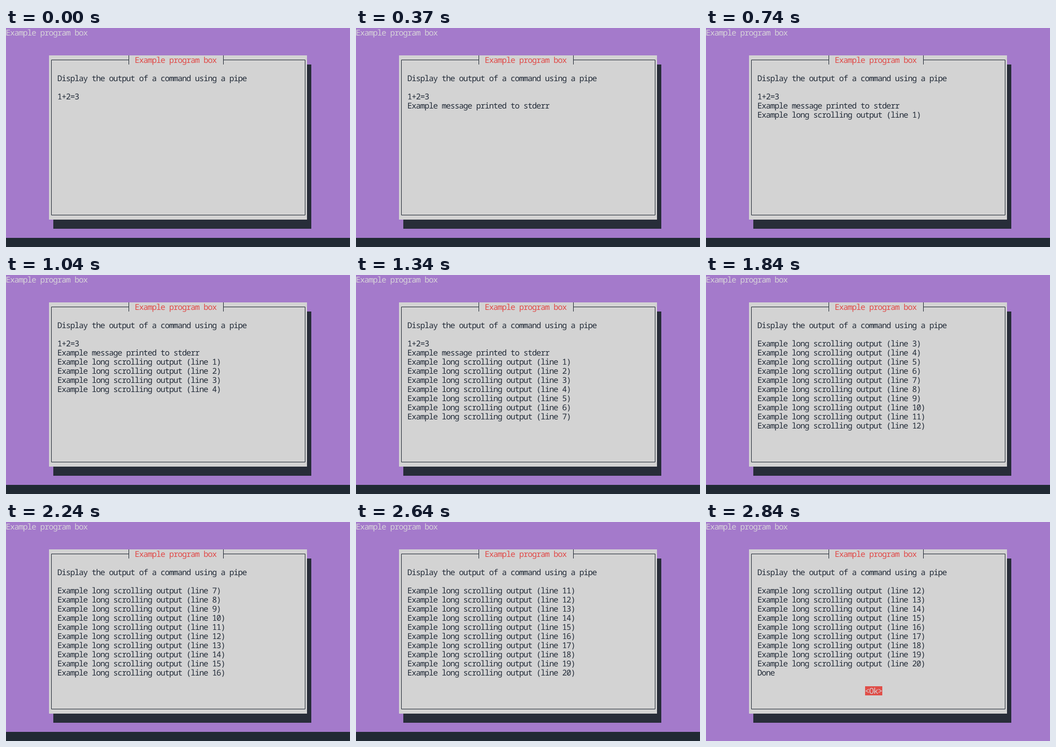
Animation of 640 by 408 pixels, one loop 3510 ms. Source, as an HTML page:

```html
<!DOCTYPE html>
<html lang="en">
<head>
<meta charset="utf-8">
<title>Example program box</title>
<style>
  html, body { margin: 0; width: 100%; height: 100%; overflow: hidden; background: #a47acb; }
  svg { display: block; width: 640px; height: 408px; }
  text {
    font: 15px "Noto Sans Mono", "DejaVu Sans Mono", monospace;
    letter-spacing: -1px;
    text-rendering: geometricPrecision;
    white-space: pre;
    fill: #222b38;
  }
  .light { fill: #d7d4d9; }
  .head { font-weight: 300; }
  .red { fill: #e04a48; }
  .frame { fill: none; stroke: #222a35; stroke-width: 1; }
</style>
</head>
<body>
<svg id="stage" viewBox="0 0 640 408">
  <rect width="640" height="408" fill="#a47acb"/>
  <rect id="bar" y="391" width="640" height="17" fill="#212a34"/>
  <rect x="88" y="68" width="480" height="306" fill="#282d39"/>
  <rect x="80" y="51" width="480" height="306" fill="#d3d3d3"/>
  <path class="frame" d="M228.5 59.5H84.5V348.5H556.5V59.5H404.5M228.5 51V68M404.5 51V68"/>
  <rect id="button" x="296" y="306" width="32" height="17" fill="#e04e48"/>
</svg>
<script>
  const LOOP = 3510, ROWS = 10, CELL_W = 8, CELL_H = 17;
  const FIRST = 740, STEP = 100, COUNT = 20, DONE = 2840;
  const stage = document.getElementById('stage');
  const bar = document.getElementById('bar');
  const button = document.getElementById('button');

  // Places text on the terminal's character grid.
  function put(col, row, str, cls = '') {
    const el = document.createElementNS('http://www.w3.org/2000/svg', 'text');
    el.setAttribute('x', col * CELL_W - 0.5);
    el.setAttribute('y', row * CELL_H + 14);
    el.setAttribute('class', cls);
    el.textContent = str;
    return stage.appendChild(el);
  }

  put(0, 0, 'Example program box', 'light head');
  put(30, 3, 'Example program box', 'red');
  put(12, 5, 'Display the output of a command using a pipe');
  const ok = put(37, 18, '<Ok>', 'light');
  const rows = Array.from({ length: ROWS }, (_, i) => put(12, 7 + i, ''));

  const log = ['1+2=3', 'Example message printed to stderr'];
  for (let n = 1; n <= COUNT; n++) log.push(`Example long scrolling output (line ${n})`);
  log.push('Done');

  function printed(t) {
    if (t < 370) return 1;
    if (t < FIRST) return 2;
    if (t < DONE) return 2 + Math.min(COUNT, Math.floor((t - FIRST) / STEP) + 1);
    return log.length;
  }

  let last = 0;
  function draw() {
    const t = performance.now() % LOOP;
    const n = printed(t);
    if (n !== last) {
      last = n;
      const top = Math.max(0, n - ROWS);
      rows.forEach((row, i) => {
        row.textContent = top + i < n ? log[top + i] : '';
      });
      const done = n === log.length;
      bar.style.display = done ? 'none' : '';
      button.style.display = ok.style.display = done ? '' : 'none';
    }
    requestAnimationFrame(draw);
  }
  draw();
</script>
</body>
</html>
```
